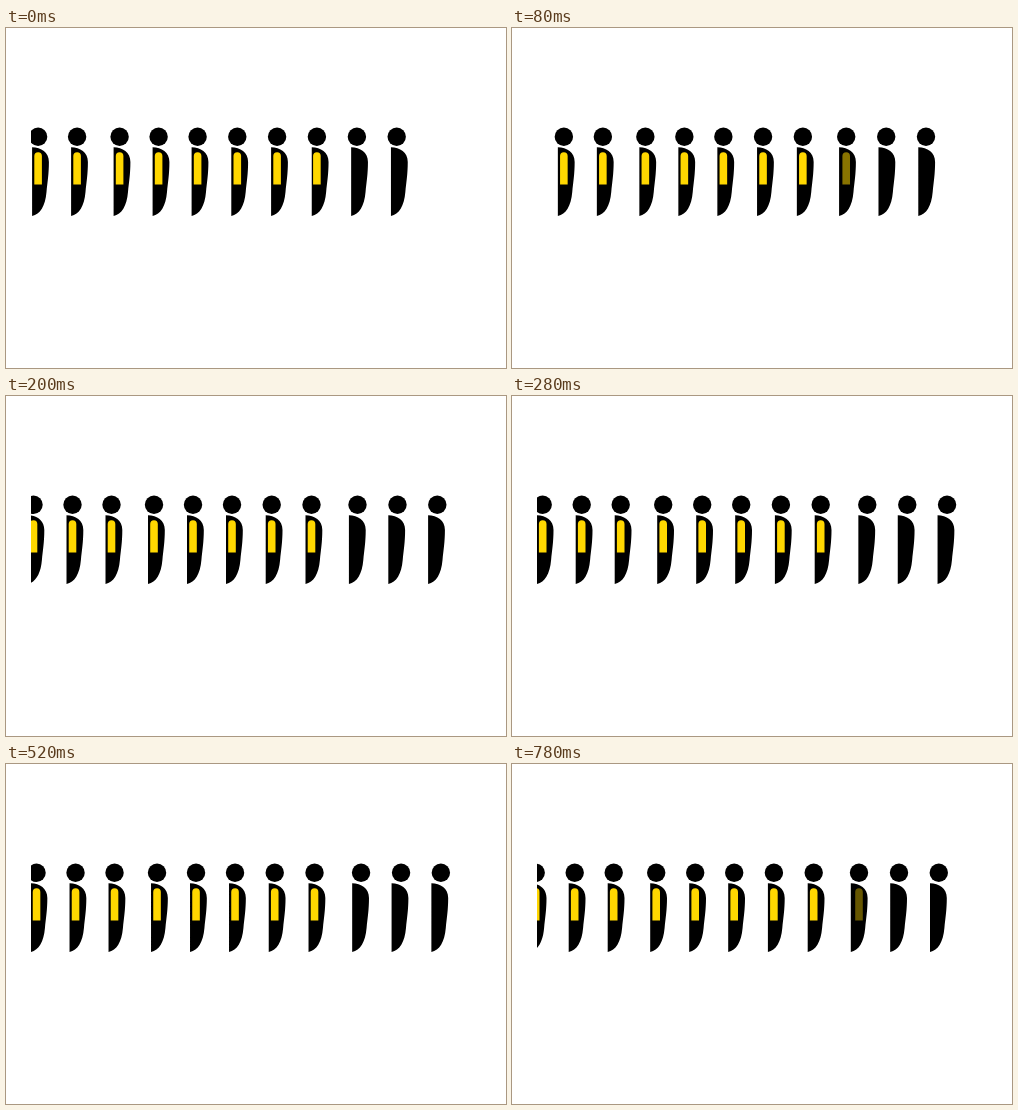
Recreate the animation shown at these times as an HTML page. Size 500 by 340 pixels, loop 800 ms.

```html
<!DOCTYPE html>
<html lang="en">
<head>
<meta charset="utf-8">
<title>Queue</title>
<style>
  html, body { margin: 0; width: 100%; height: 100%; overflow: hidden; background: #fff; }
  svg { display: block; width: 500px; height: 340px; }
</style>
</head>
<body>
<svg viewBox="0 0 500 340">
  <defs>
    <clipPath id="stage"><rect x="25" y="90" width="450" height="110"/></clipPath>
    <circle id="head" cy="108.8" r="9.2"/>
    <path id="torso" d="M0 119.2C9 119.5 16.8 124 16.8 134C16.8 146 15.4 154 14.4 164C13.2 178 8 186.5 0 188Z"/>
    <path id="vest" d="M-3.8 156.5V128A3.8 3.8 0 0 1 3.8 128V156.5Z" fill="#ffd700"/>
  </defs>
  <g id="queue" clip-path="url(#stage)"></g>
</svg>
<script>
const LOOP = 800, STEP = 20;
const queue = document.getElementById('queue');

// Distance from the resting place: a fast start, an overshoot, a slow return.
const slide = [[0, -30.6], [40, -19.6], [120, -4], [280, 7], [440, 8], [600, 5], [780, 0]];
const fade = [[0, 1], [40, 0.72], [120, 0.35], [200, 0], [760, 0], [780, 0.4]];

function segment(points, t) {
  let i = 0;
  while (i < points.length - 2 && t >= points[i + 1][0]) i++;
  return i;
}

function linear(points, t) {
  const i = segment(points, t), [t0, a] = points[i], [t1, b] = points[i + 1];
  return a + (b - a) * (t - t0) / (t1 - t0);
}

function smooth(points, t) {
  const slope = i => (points[i + 1][1] - points[i][1]) / (points[i + 1][0] - points[i][0]);
  const tangent = i => {
    if (i === 0) return slope(0) * 1.15;
    if (i === points.length - 1) return slope(i - 1);
    const before = points[i][0] - points[i - 1][0], after = points[i + 1][0] - points[i][0];
    return (slope(i - 1) * after + slope(i) * before) / (before + after);
  };
  const i = segment(points, t), [t0, a] = points[i], [t1, b] = points[i + 1];
  const d = t1 - t0, u = (t - t0) / d, v = 1 - u;
  return a * v * v * (1 + 2 * u) + b * u * u * (3 - 2 * u)
    + d * u * v * (v * tangent(i) - u * tangent(i + 1));
}

function part(id, parent) {
  const el = document.createElementNS('http://www.w3.org/2000/svg', 'use');
  el.setAttribute('href', '#' + id);
  return parent.appendChild(el);
}

function person(headX, torsoX, hasVest) {
  const group = queue.appendChild(document.createElementNS('http://www.w3.org/2000/svg', 'g'));
  const torso = part('torso', group), head = part('head', group);
  const vest = hasVest && part('vest', group);
  return {
    group, vest,
    move(headShift, torsoShift) {
      head.setAttribute('x', headX + headShift);
      torso.setAttribute('x', torsoX + torsoShift);
      if (vest) vest.setAttribute('x', headX + headShift);
    }
  };
}

const waiting = [23.7, 62.7, 101.7, 144.2, 183.2, 222.2, 261.9, 301.7, 341.3]
  .map(x => person(x, x - 6, true));
const newcomer = waiting[8];
const served = [[347, 338.8], [387, 378.2], [426.8, 418]]
  .map(([head, torso], i) => person(head, torso, i === 0));

function draw(time) {
  let t = Math.floor((time % LOOP) / STEP) * STEP;
  if (t > 600 && t < 780) t = 600;
  const shift = smooth(slide, t);
  waiting.forEach(p => p.move(shift, shift));
  // Those already served lean forward: the head travels further than the torso.
  served.forEach(p => p.move(shift * 1.18, shift * 1.08));
  served[0].vest.setAttribute('opacity', linear(fade, t));
  newcomer.group.setAttribute('visibility', t === 600 ? 'visible' : 'hidden');
}

const start = performance.now();
function tick() {
  draw(performance.now() - start);
  requestAnimationFrame(tick);
}
draw(0);
requestAnimationFrame(tick);
</script>
</body>
</html>
```
